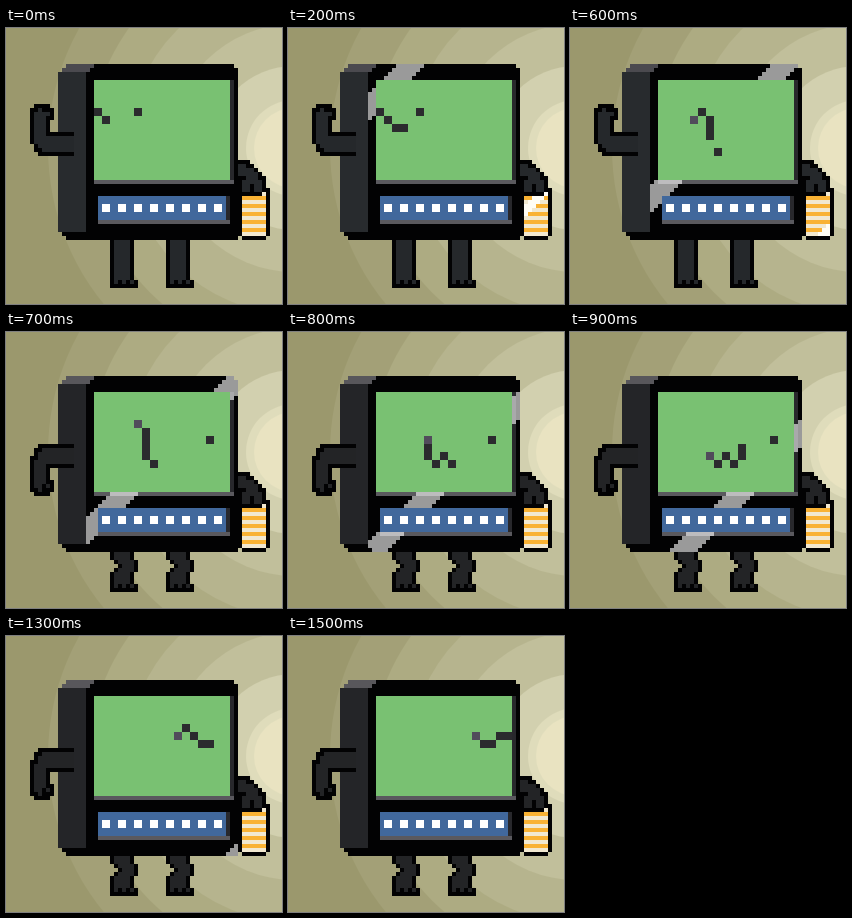
These frames come from a looping animation (276 px wide and 276 px high, 1600 ms). An HTML page with a canvas:

```html
<!DOCTYPE html>
<html lang="en">
<head>
<meta charset="utf-8">
<title>Waving television</title>
<style>
html, body { margin: 0; width: 100%; height: 100%; overflow: hidden; background: #9b986d; }
canvas { display: block; width: 276px; height: 276px; }
</style>
</head>
<body>
<canvas width="276" height="276"></canvas>
<script>
const ctx = document.querySelector('canvas').getContext('2d');
const STEP = 100, STEPS = 16;
const BLACK = '#020203', INK = '#2b2b2e', FADED = '#514c5b';
const LEDGE = '#5a595e', SHADE = '#28282c', GLOSS = 'rgba(255,255,255,.6)';

const clamp = (v, lo, hi) => Math.min(Math.max(v, lo), hi);

// Rectangle given by its edges
function box(color, x0, y0, x1, y1) {
  ctx.fillStyle = color;
  ctx.fillRect(x0, y0, x1 - x0, y1 - y0);
}

// Diagonal band of 4px cells, starting where x + y = lo
function band(color, lo, width, x0, y0, x1, y1) {
  lo = Math.round(lo / 4) * 4;
  for (let y = y0; y < y1; y += 4) {
    const a = Math.max(x0, lo - y);
    const b = Math.min(x1, lo + width - y);
    if (b > a) box(color, a, y, b, y + 4);
  }
}

function backdrop() {
  box('#9b986d', 0, 0, 276, 276);
  const rings = [[246, '#a3a077'], [204, '#adab82'], [166, '#b6b48e'],
                 [124, '#c1bf9b'], [82, '#d2d0af'], [48, '#dfdcbb'], [40, '#e9e3c1']];
  for (const [r, color] of rings) {
    ctx.fillStyle = color;
    ctx.beginPath();
    ctx.arc(288, 120, r, 0, 7);
    ctx.fill();
  }
}

function legs(low, skin) {
  for (const x of [104, 160]) {
    if (low) {
      box(BLACK, x, 216, x + 24, 228);
      box(BLACK, x + 4, 228, x + 28, 232);
      box(BLACK, x + 8, 232, x + 28, 236);
      box(BLACK, x + 4, 236, x + 28, 240);
      box(BLACK, x, 240, x + 24, 252);
      box(skin, x + 4, 220, x + 20, 228);
      box(skin, x + 8, 228, x + 24, 232);
      box(skin, x + 12, 232, x + 24, 236);
      box(skin, x + 8, 236, x + 24, 240);
    } else {
      box(BLACK, x, 208, x + 24, 252);
      box(skin, x + 4, 212, x + 20, 252);
    }
    box(BLACK, x, 252, x + 28, 260);
    box(skin, x + 4, low ? 240 : 248, x + 20, 256);
    box(skin, x + 20, 252, x + 24, 256);
    box(BLACK, x + 8, 252, x + 12, 260);
    box(BLACK, x + 16, 252, x + 20, 260);
  }
}

function leftArm(low, skin) {
  if (low) {
    box(BLACK, 32, 112, 68, 136);
    box(BLACK, 28, 116, 44, 148);
    box(BLACK, 24, 124, 44, 160);
    box(BLACK, 40, 148, 48, 160);
    box(BLACK, 28, 160, 44, 164);
    box(skin, 36, 116, 68, 132);
    box(skin, 32, 120, 40, 148);
    box(skin, 28, 128, 40, 156);
    box(skin, 40, 152, 44, 156);
    box(skin, 32, 156, 40, 160);
    box(BLACK, 36, 152, 40, 164);
  } else {
    box(BLACK, 28, 76, 44, 80);
    box(BLACK, 24, 80, 48, 92);
    box(BLACK, 24, 92, 44, 116);
    box(BLACK, 28, 104, 68, 124);
    box(BLACK, 32, 120, 68, 128);
    box(skin, 28, 84, 40, 116);
    box(skin, 32, 80, 40, 88);
    box(skin, 40, 84, 44, 88);
    box(skin, 32, 108, 68, 120);
    box(skin, 36, 120, 68, 124);
    box(BLACK, 36, 80, 40, 84);
  }
}

function canAndArm(i, skin) {
  box(BLACK, 232, 160, 264, 208);
  box(BLACK, 236, 160, 260, 212);
  box('#f1e8d0', 236, 164, 260, 208);
  for (let y = 168; y < 208; y += 8) box('#f9b234', 236, y, 260, y + 4);
  if (i > 0 && i < 7) band('#fffdf5', 392 + 10 * i, 12, 236, 164, 260, 208);
  for (let y = 132; y < 148; y += 4) box(BLACK, 232, y, y + 112, y + 4);
  box(BLACK, 232, 148, 260, 164);
  box(BLACK, 236, 164, 256, 168);
  box(skin, 232, 136, 240, 140);
  box(skin, 232, 140, 248, 148);
  box(skin, 240, 144, 252, 152);
  box(skin, 236, 152, 256, 164);
  box(BLACK, 244, 156, 248, 164);
}

function set(i, shine, side, edge) {
  box(side, 52, 44, 80, 204);
  box(side, 56, 40, 84, 44);
  box(edge, 60, 36, 88, 40);
  box(edge, 56, 40, 84, 44);
  box(BLACK, 56, 204, 228, 208);
  box(BLACK, 60, 208, 228, 212);

  ctx.save();
  ctx.beginPath();
  ctx.rect(88, 36, 140, 176);
  ctx.rect(80, 44, 152, 164);
  ctx.rect(84, 40, 148, 172);
  ctx.clip();
  box(BLACK, 80, 36, 232, 212);
  box(SHADE, 224, 52, 228, 152);
  box(LEDGE, 88, 152, 228, 156);
  box(SHADE, 220, 168, 224, 192);
  box(LEDGE, 92, 192, 224, 196);
  if (i) band(GLOSS, shine, 28, 80, 36, 232, 212);
  ctx.restore();

  box('#79c172', 88, 52, 224, 152);
  box('#41689c', 92, 168, 220, 192);
  for (let x = 96; x < 216; x += 16) box('#fff', x, 176, x + 8, 184);
}

// Cells of the pulse line on an 8px grid, corner to corner
const corners = [[0, 0], [2, 2], [3, 2], [5, 0], [6, 1], [6, 4], [7, 5], [8, 4],
                 [9, 5], [10, 4], [10, 1], [11, 0], [13, 2], [14, 2], [15, 1], [16, 1]];
const path = [corners[0]];
corners.slice(1).forEach(([x, y], n) => {
  const [px, py] = corners[n];
  const count = Math.max(Math.abs(x - px), Math.abs(y - py));
  for (let k = 1; k <= count; k++) {
    path.push([px + (x - px) * k / count, py + (y - py) * k / count]);
  }
});

// The line runs slowly, speeds up and stretches, then slows down
function trace(i) {
  const rush = clamp(i - 6, 0, 5);
  const head = Math.round(1 + 1.2 * Math.min(i, 6) + 2 * rush + Math.max(i - 11, 0));
  const length = i > 6 && i < 12 ? 5 : 4;
  const tail = Math.max(0, head - length);
  const plot = (k, color) => {
    const x = 88 + 8 * path[k][0], y = 80 + 8 * path[k][1];
    box(color, x, y, x + 8, y + 8);
  };
  for (let k = tail; k <= head; k++) plot(k, k === tail && tail ? FADED : INK);
  const next = [5, 10, 20].find(k => k > head);
  if (next) plot(next, INK);
}

function draw(i) {
  const low = i > 6, drop = low ? 8 : 0;
  const skin = low ? '#232426' : '#25282b';
  const shine = 100 + 20.3 * i + 0.42 * i * i;
  backdrop();
  legs(low, skin);
  ctx.save();
  ctx.translate(0, drop);
  set(i, shine - drop, low ? '#242528' : '#282b2e', low ? '#58575b' : '#4b4a4f');
  trace(i);
  canAndArm(i, skin);
  ctx.restore();
  leftArm(low, skin);
}

const start = performance.now();
let shown = -1;
function tick(now) {
  const i = Math.floor(Math.max(0, now - start) / STEP) % STEPS;
  if (i !== shown) draw(shown = i);
  requestAnimationFrame(tick);
}
tick(start);
</script>
</body>
</html>
```
